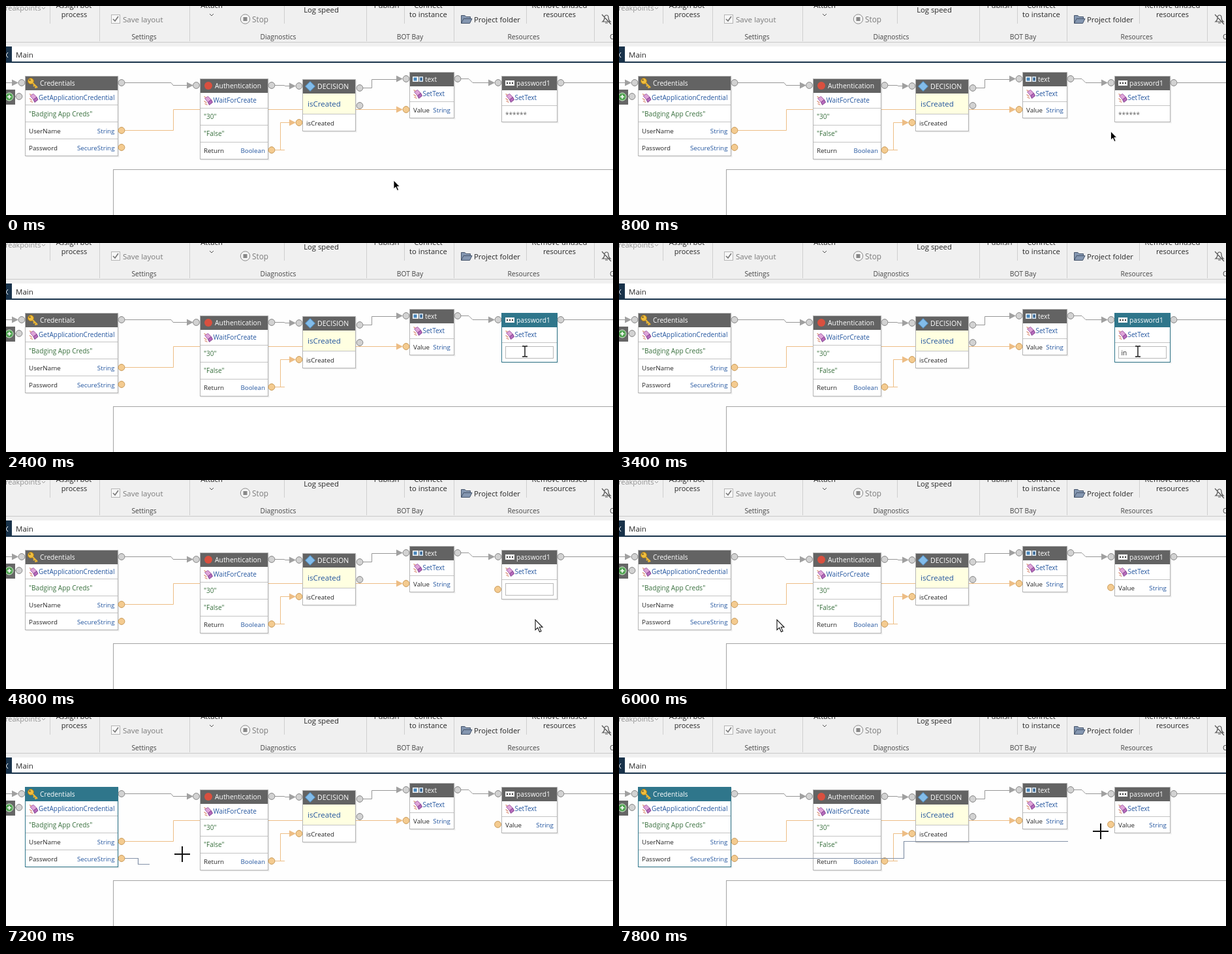
Recreate the animation shown at these times as an HTML page. Size 930 by 320 pixels, loop 8 s.

```html
<!DOCTYPE html>
<html lang="en">
<head>
<meta charset="utf-8">
<title>Connecting a password input</title>
<style>
  html, body { margin: 0; width: 100%; height: 100%; overflow: hidden; background: #fefefe; }
  svg { display: block; width: 930px; height: 320px; font-family: "Open Sans", "Noto Sans", sans-serif; }
  text { white-space: pre; }
</style>
</head>
<body>
<svg id="stage" viewBox="0 0 930 320"></svg>
<script>
const LOOP = 8000, STEP = 200;
const BLUE = '#24569f', GREEN = '#39703e', INK = '#262626', TEAL = '#2f768b', DARK = '#636363', WIRE = '#969696', ORANGE = '#edbd85';

const text = (x, y, label, { size = 10, fill = INK, anchor = 'start' } = {}) =>
  `<text x="${x}" y="${y}" font-size="${size}" fill="${fill}" text-anchor="${anchor}">${label}</text>`;
const centered = (x, y, label, size = 11.3, fill = INK) => text(x, y, label, { size, fill, anchor: 'middle' });
const rect = (x, y, w, h, fill, stroke = 'none') =>
  `<rect x="${x}" y="${y}" width="${w}" height="${h}" fill="${fill}" stroke="${stroke}"/>`;
const path = (d, stroke, fill = 'none', width = 1) =>
  `<path d="${d}" fill="${fill}" stroke="${stroke}" stroke-width="${width}"/>`;
const circle = (x, y, r, fill, stroke = 'none') => `<circle cx="${x}" cy="${y}" r="${r}" fill="${fill}" stroke="${stroke}"/>`;
const at = (x, y, body) => `<g transform="translate(${x} ${y})">${body}</g>`;
const port = (x, y) => circle(x, y, 4.9, '#d2d2d2', '#858585');
const dataPort = (x, y) => circle(x, y, 4.9, '#f4cb90', '#c99a58');
const arrow = (x, y, color = '#a0a0a0') => path(`M${x - 10} ${y - 5}L${x} ${y}L${x - 10} ${y + 5}Z`, 'none', color);

const icons = {
  key: circle(-3, -3, 4.5, '#f0bd3c', '#a87813') + circle(-4.5, -4.5, 1.2, '#6b5a35') +
    path('M0 0L7 7M3 3L1 5M5.500 5.500L3.500 7.500', '#e9b434', 'none', 2.4),
  disc: circle(0, 0, 6, '#d9503f'),
  diamond: path('M0 -7.500L7.500 0L0 7.500L-7.500 0Z', '#4b8dc4', '#82bcea'),
  field: rect(-8, -4, 9, 8, '#f5f8fb') + rect(-6.500, -2.500, 5, 5, '#4786bb') + rect(2, -4, 6, 8, '#dceaf5') + rect(3.500, -2.500, 3, 5, '#24588b'),
  mask: rect(-7, -4, 14, 8, '#f6f6f6') + [-4, 0, 4].map(x => rect(x - 1, -1, 2, 2, '#333')).join(''),
  method: path('M-6 -3L-1 -6L4 -1L-1 3Z', '#a05da8', '#dfa4d8') + path('M-1 3L4 -1L6 3L1 7Z', '#81438f', '#b66abb') +
    path('M-7 1L-3 4M-6 5L-2 7M-7 -6L-4 -4', '#d98a70', 'none', 1.2),
};

// Frame, header and row separators shared by all nodes.
function node({ x, y, w, h, head = 22, icon, iconX, title, titleX, size = 10.2, rules = [], state = '' }) {
  const border = { active: TEAL, hover: '#111' }[state] || '#b4b4b4';
  return rect(x + 1.5, y + 1.5, w, h, '#00000012') + rect(x + .5, y + .5, w - 1, h - 1, '#fff') +
    rect(x, y, w, head, state === 'active' ? TEAL : DARK) +
    at(iconX, y + head / 2, icons[icon]) + text(titleX, y + head / 2 + 4, title, { size, fill: '#fff' }) +
    rules.map(ry => path(`M${x} ${ry + .5}h${w}`, '#c4c4c4')).join('') +
    rect(x + .5, y + .5, w - 1, h - 1, 'none', border);
}
const method = (x, y, name, size = 10) => at(x, y, icons.method) + text(x + 11 - 4, y + 3.500, name, { size, fill: BLUE });
const property = (x, right, y, name, type) =>
  text(x, y, name, { size: 9.8 }) + text(right, y, type, { size: 9.8, fill: BLUE, anchor: 'end' });

function ribbon() {
  const gray = '#7b7b7b';
  const folder = path('M697.500 26.500V14.500H703L705 16.500H711.500V19M697.500 26.500L701 19.500H714L710.500 26.500Z', '#46556b', '#8496b0');
  const bell = path('M914 24Q917 22 917 18Q917 14 920 14Q923 14 923 18Q923 22 926 24ZM918 26H922M913 13L927 28', '#555', 'none', 1.2);
  return rect(0, 0, 930, 62, '#f0f0f0') +
    [143.5, 281.5, 552.5, 686.5, 901.5].map(x => path(`M${x} 0V54`, '#cfcfcf')).join('') +
    [67.5, 426.5, 610.5, 797.5].map(x => path(`M${x} 0V27`, '#cfcfcf')).join('') +
    path('M0 55.500H930', '#cbcbcb') +
    text(-1, 7, 'reakpoints', { size: 11, fill: '#929292' }) + path('M55 2L57.500 4.500L60 2', '#929292') +
    centered(104, 3, 'Assign bot') + centered(104.5, 17, 'process', 11) +
    rect(161.5, 13.5, 13, 13, '#f7f7f7', '#b5b5b5') + path('M164 20L167 23L172 16', '#777', 'none', 1.6) +
    text(179, 25, 'Save layout', { size: 11.6, fill: gray }) +
    centered(315, 3, 'Attach') + path('M312 12L315 15L318 12', '#555') +
    circle(366.5, 20, 7.2, '#f5f5f5', '#888') + rect(363.5, 17, 6, 6, '#888') +
    text(372 + 5, 25, 'Stop', { size: 11.8, fill: gray }) +
    centered(483, 10, 'Log speed') + centered(583, 3, 'Publish') + centered(647, 3, 'Connect') +
    centered(647, 17, 'to instance') + folder + text(717, 25, 'Project folder', { size: 11.3 }) +
    centered(848, 3, 'Remove unused') + centered(848, 17, 'resources', 11) + bell +
    [[211.5, 'Settings'], [417, 'Diagnostics'], [619, 'BOT Bay'], [793, 'Resources']]
      .map(([x, label]) => centered(x, 51, label, 10.3, '#444')).join('') +
    text(925, 51, 'C', { size: 10.3, fill: '#444' }) +
    rect(0, 62, 930, 24, '#fff') + rect(0, 62, 9, 24, '#18324a') + path('M3 71L0 75L3 79', '#fff') +
    text(15, 79, 'Main', { size: 11.5 }) + rect(0, 85, 930, 2, '#18324a');
}

function wires() {
  return path('M0 117.500H10M14 138.500H20M182 117.500H253L256 121.500H281M412 121.500H426L428 122.500H437M547 125.500H560.500V112.500H601M697 111.500H709L715 117.500H741M855 117.500H930', WIRE) +
    path('M182 190.500H256.500V158.500H599M412 220.500H427M420.500 220.500V178.500H435', ORANGE) +
    arrow(19, 117.5) + arrow(287, 121.5) + arrow(444, 122.5) + arrow(608, 111.5) + arrow(749, 117.5) +
    arrow(444, 178.5, ORANGE) + arrow(608, 158.5, ORANGE);
}

function fixedNodes() {
  return rect(0, 128, 14, 23, '#666') + circle(5, 139, 6, '#54a455', '#d6efd3') + path('M2 139H8M5 136V142', '#fff', 'none', 1.6) +
    node({ x: 297, y: 111, w: 105, h: 124, icon: 'disc', iconX: 310, title: 'Authentication', titleX: 320, size: 10.4, rules: [156, 182, 208] }) +
    method(310.5, 144.5, 'WaitForCreate') + text(303, 173, '"30"', { fill: GREEN }) + text(303, 199, '"False"', { fill: GREEN }) +
    property(303, 397, 225, 'Return', 'Boolean') +
    node({ x: 454, y: 112, w: 82, h: 80, icon: 'diamond', iconX: 466, title: 'DECISION', titleX: 477, size: 10.6, rules: [165] }) +
    rect(455, 134, 80, 31, '#ffffe1') + text(462, 154, 'isCreated', { size: 11.6, fill: BLUE }) + text(460, 183, 'isCreated', { size: 9.8 }) +
    node({ x: 618, y: 101, w: 69, h: 71, icon: 'field', iconX: 631, title: 'text', titleX: 642, rules: [146] }) +
    method(631.5, 134.5, 'SetText') + property(624, 681, 163, 'Value', 'String');
}

function credentials(t) {
  const state = t >= 7200 ? 'active' : t >= 6600 ? 'hover' : '';
  return node({ x: 29, y: 107, w: 143, h: 123, icon: 'key', iconX: 41, title: 'Credentials', titleX: 52, rules: [151, 177, 203], state }) +
    method(43, 140.5, 'GetApplicationCredential') + text(35, 169, '"Badging App Creds"', { size: 10.1, fill: GREEN }) +
    property(35, 166.5, 195, 'UserName', 'String') + property(35, 166.5, 221, 'Password', 'SecureString');
}

function password(t) {
  const editing = t >= 1800 && t < 5000;
  const frame = node({
    x: 759, y: 107, w: 86, h: editing ? 76 : 71, icon: 'mask', iconX: 772, title: 'password1', titleX: 782,
    rules: [152], state: t >= 1000 && t < 4600 ? 'active' : '',
  }) + method(772.5, 140.5, 'SetText');
  const stars = x => text(x, 170, '******', { fill: '#666' });
  if (t >= 5000) return frame + property(765, 839, 169, 'Value', 'String') + dataPort(753.5, 164.5);
  if (!editing) return frame + (t >= 1000 ? rect(765, 158, 74, 14, '#eeeeee') : '') + stars(765);
  const typed = t < 3000 || t >= 4000 ? '' : 'in'.slice(0, t < 3200 ? 1 : 2);
  return frame + rect(765.5, 158.5, 73, 18, '#fff', '#b9b9b9') +
    (t < 2400 ? stars(769) : text(769.5, 172, typed)) + (t >= 4000 ? dataPort(753.5, 167.5) : '');
}

function ports() {
  return [[24, 117.5], [177, 117.5], [20, 138.5], [291.5, 121.5], [407, 121.5], [449, 122.5], [542, 125.5],
    [542, 152.5], [613, 111.5], [692, 111.5], [754, 117.5], [850, 117.5]].map(p => port(...p)).join('') +
    [[177, 190.5], [177, 216.5], [407, 220.5], [449, 178.5], [613, 158.5]].map(p => dataPort(...p)).join('');
}

const pointerShape = 'M0 0V15.500L3.700 12.200L6.500 18.500L9 17.400L6.300 11.300H11Z';
const cursors = {
  black: `<g transform="scale(.84)">${path(pointerShape, '#fff', '#000')}</g>`,
  arrow: path(pointerShape, '#111', '#fff', 1.1),
  beam: path('M-4 -8H-1L0 -7L1 -8H4M0 -7V7M-4 8H-1L0 7L1 8H4', '#fff', 'none', 3) +
    path('M-4 -8H-1L0 -7L1 -8H4M0 -7V7M-4 8H-1L0 7L1 8H4', '#111', 'none', 1.4),
  hand: path('M-1 1Q1 -1 2 2L4 9Q6 7 7 9Q9 7 10 10Q12 9 12 12V17Q12 20 10 22V24H2V22L-4 15Q-5 12 -2 13L1 15L-2 3Z', '#111', '#fff', 1.2) +
    path('M4 9V13M7 9V13M10 10V14', '#111'),
  cross: path('M-12 0H12M0 -12V12', '#111', 'none', 2),
};

// time, x, y, cursor shape from that time on
const moves = [
  [0, 594, 267, 'black'], [200, 600, 265, 'black'], [600, 712, 218, 'black'], [1000, 795, 166, 'beam'],
  [4200, 795, 166, 'beam'], [4400, 803, 186, 'arrow'], [4600, 811, 211, 'arrow'], [4800, 811, 214, 'arrow'],
  [5000, 808, 215, 'arrow'], [5400, 640, 231, 'arrow'], [5600, 430, 232, 'arrow'], [5800, 290, 222, 'arrow'],
  [6000, 242, 214, 'arrow'], [6400, 196, 218, 'arrow'], [6600, 179, 218, 'hand'], [7000, 179, 218, 'hand'],
  [7200, 270, 210, 'cross'], [7400, 430, 203, 'cross'], [7800, 738, 175, 'cross'], [8000, 738, 175, 'cross'],
];
function pointer(t) {
  const i = moves.findLastIndex(m => m[0] <= t);
  const [t0, x0, y0, shape] = moves[i], [t1, x1, y1] = moves[i + 1] || [t0 + 1, x0, y0];
  const k = (t - t0) / (t1 - t0);
  return { x: x0 + (x1 - x0) * k, y: y0 + (y1 - y0) * k, shape };
}

function dragWire(t, { x, y }) {
  if (t < 7200) return '';
  const endX = x - 50, endY = Math.round(y + 15) + .5, middle = Math.round((182 + endX) / 2) + 1.5;
  return path(`M182 216.500H${middle}V${endY}H${endX}`, '#8492a8', 'none', 1.2);
}

const stage = document.getElementById('stage');
const backdrop = rect(0, 0, 930, 320, '#fefefe') + ribbon() + rect(164.5, 250.5, 800, 100, '#fff', '#a3a3a3') + wires() + fixedNodes();
let shown = -1;
function tick(now) {
  const t = Math.floor(now % LOOP / STEP) * STEP;
  if (t !== shown) {
    const mouse = pointer(t);
    stage.innerHTML = backdrop + credentials(t) + password(t) + ports() + dragWire(t, mouse) +
      at(mouse.x, mouse.y, cursors[mouse.shape]);
    shown = t;
  }
  requestAnimationFrame(tick);
}
tick(performance.now());
</script>
</body>
</html>
```
